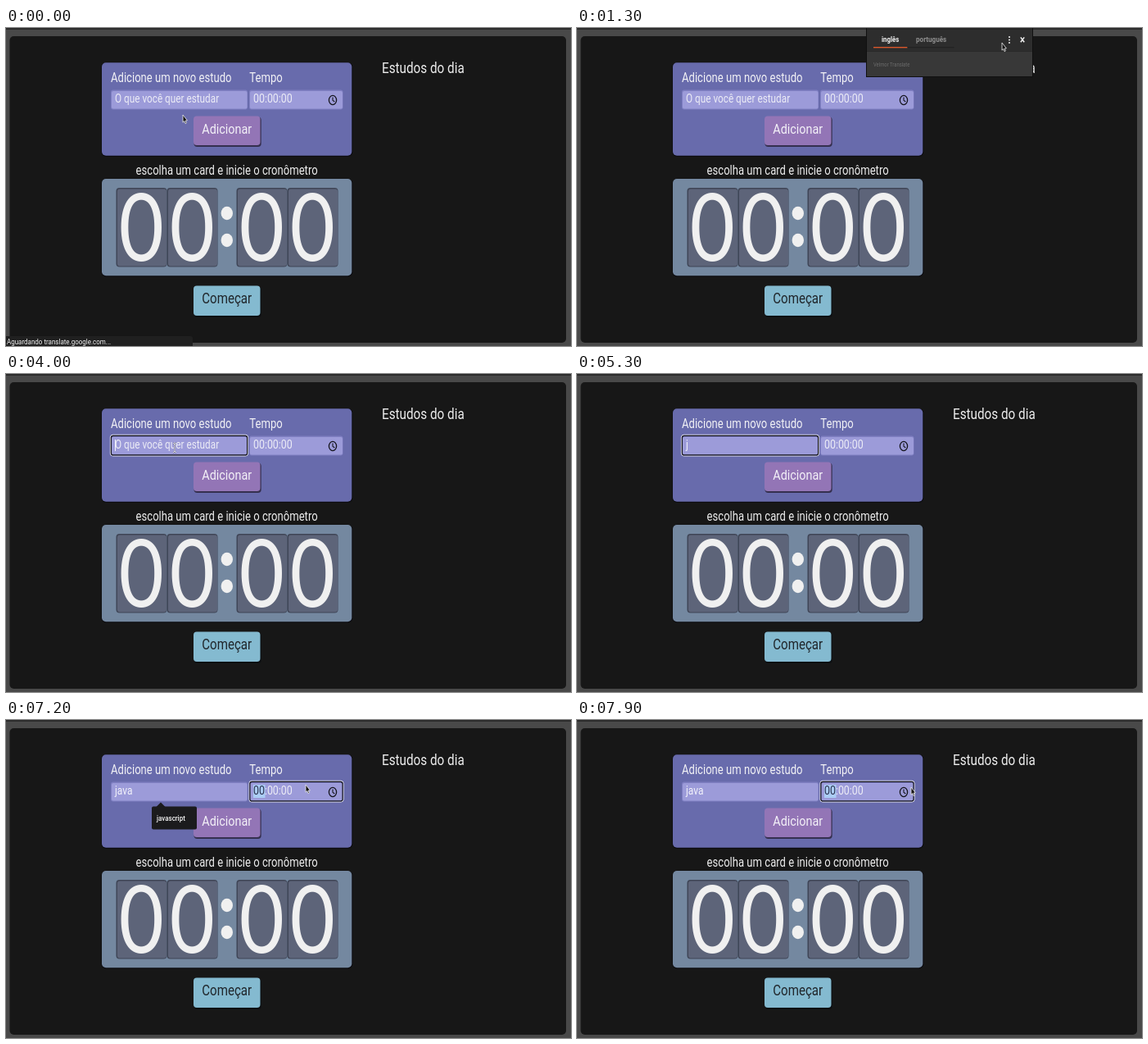
Animation, 690 px wide and 388 px high, one loop 8000 ms. Source, as an HTML page:

```html
<!DOCTYPE html>
<html lang="pt">
<head>
<meta charset="utf-8">
<title>Estudos do dia</title>
<style>
  html, body { margin: 0; width: 100%; height: 100%; overflow: hidden; background: #494949; }
  svg { display: block; width: 100%; height: 100%; }
  text { font-family: Roboto, sans-serif; }
  .digit { font-family: Lato, sans-serif; }
</style>
</head>
<body>
<svg id="stage" viewBox="0 0 690 388" preserveAspectRatio="none"></svg>
<script>
const NS = 'http://www.w3.org/2000/svg';
const LOOP = 8000, STEP = 100;
const TALL = 1.2; // the whole page is shown a little taller than wide
const stage = document.getElementById('stage');

function add(tag, attrs, parent = stage) {
  const el = document.createElementNS(NS, tag);
  for (const k in attrs) el.setAttribute(k, attrs[k]);
  parent.appendChild(el);
  return el;
}
const group = () => add('g', {});
const box = (x, y, w, h, fill, rx = 0, parent = stage, more = {}) =>
  add('rect', { x, y, width: w, height: h, rx, fill, ...more }, parent);
const line = (d, stroke, width, parent = stage) =>
  add('path', { d, stroke, 'stroke-width': width, fill: 'none' }, parent);
function label(str, x, y, size, fill, parent = stage, more = {}) {
  const el = add('text', {
    transform: `translate(${x} ${y}) scale(1 ${TALL})`, 'font-size': size, fill, ...more
  }, parent);
  el.textContent = str;
  return el;
}
const show = (el, on) => el.setAttribute('visibility', on ? 'visible' : 'hidden');

// Page
box(0, 0, 690, 388, '#494949');
box(0, 0, 690, 2, '#2c2c2c');
box(4.5, 10, 679.5, 374, '#171717', 5);

// Form card
function card(y, h, fill) {
  box(116.5, y - .3, 306.8, h + 1.5, '#0c0c10', 5.5);
  box(117, y, 305.3, h, fill, 5);
}
card(42.3, 113.4, '#686bac');
label('Adicione um novo estudo', 128, 65.5, 13.1, '#f1f1f5');
label('Tempo', 297.3, 65.5, 13.1, '#f1f1f5');
label('Estudos do dia', 459, 54.5, 15.3, '#ededed');

function field(x, w) {
  box(x, 75.5, w, 24, '#7f7fc2', 3);
  box(x + 1, 77, w - 1.5, 21.5, '#9c9bd9', 2);
}
field(128, 167);
field(297, 114.5);

const hint = label('O que você quer estudar', 133, 91, 11.8, '#ececf6');
const typed = label('', 133, 91, 12, '#f2f2fa');
const caret = box(133, 80, 1, 14, '#f4f4fb');

const picked = box(302, 79, 14.5, 16, '#abcdf5');
const hours = label('00', 302, 91, 12.4, '#ececf6');
label(':00:00', 315.9, 91, 12.4, '#ececf6');
add('ellipse', { cx: 399, cy: 88, rx: 4.6, ry: 5.6, fill: 'none', stroke: '#14141c', 'stroke-width': 1.3 });
line('M399 84.5V88.3L401.3 90', '#14141c', 1.1);

// Dark ring with a light rim outside
function focusRing(x, w) {
  const g = group();
  box(x - .6, 74.2, w + 1.2, 25.8, 'none', 3, g, { stroke: '#e6e6ee', 'stroke-width': 1 });
  box(x + .4, 75.3, w - .8, 23.6, 'none', 2.5, g, { stroke: '#15151c', 'stroke-width': 1.2 });
  return g;
}
const nameRing = focusRing(128, 167);
const timeRing = focusRing(297.5, 114);

function button(str, y, h, fill, color, size, base, shade) {
  box(229.5, y + 1, 82.2, h + 1, shade, 4);
  box(229, y, 81.5, h, fill, 4);
  label(str, 269.7, base, size, color, stage, { 'text-anchor': 'middle' });
}
button('Adicionar', 107.5, 35.5, '#9375b6', '#f3f0f7', 14.4, 129, '#35304f');

const tip = group();
add('path', { d: 'M183.5 106L189 100.5L194.5 106Z', fill: '#1b1b1d' }, tip);
box(178, 105.5, 55, 28, '#1b1b1d', 2, tip);
label('javascript', 184, 122.8, 8, '#f6f6f6', tip, { 'font-weight': 500 });

// Timer card
label('escolha um card e inicie o cronômetro', 158.6, 179, 13.1, '#ededed');
card(184, 118.2, '#7488a0');
for (const x of [135, 197, 282, 344]) {
  box(x - .5, 195, 62, 96.5, '#3f4556', 4);
  box(x + 1, 196.5, 60, 94, '#5d6479', 3);
  label('0', x + 30.3, 283.5, 95, '#f0f0f0', stage, { 'text-anchor': 'middle', class: 'digit' });
}
for (const cy of [226, 259])
  add('ellipse', { cx: 269.8, cy, rx: 7.2, ry: 8.3, fill: '#f0f0f0' });
button('Começar', 314.5, 36.5, '#84bad0', '#20262b', 15.1, 336, '#0c0f12');

// Browser status line
const status = group();
box(-4, 376, 232, 16, '#202020', 3, status);
label('Aguardando translate.google.com...', 1, 386, 8, '#f2f2f2', status);

// Translation popup
const popup = group();
box(353, 0, 204, 60, '#101010', 0, popup);
box(354, 0, 202, 59, '#383838', 0, popup);
box(354, 0, 202, 28.5, '#2d2d2d', 0, popup);
box(354, 28, 202, 1, '#292929', 0, popup);
box(354, 0, 202, 2, '#262626', 0, popup);
label('inglês', 372, 17, 7.8, '#f4f4f4', popup, { 'font-weight': 700 });
label('português', 414, 17, 8.1, '#8f8f8f', popup, { 'font-weight': 700 });
box(362, 23, 41.5, 1.4, '#d9572b', 0, popup);
box(403.5, 23.3, 57, .9, '#1f1f1f', 0, popup);
label('Velmor Translate', 362, 47, 5.9, '#6b6b6b', popup);
for (const cy of [11, 14.5, 18])
  add('circle', { cx: 528, cy, r: 1, fill: '#f0f0f0' }, popup);
line('M541.8 11.4L546.2 17.2M546.2 11.4L541.8 17.2', '#f4f4f4', 1.5, popup);

// Pointers
const arrow = add('path', {
  d: 'M0 0V9.2L1.8 7.5L3 10.6L4.4 9.9L3.2 7L5.4 6.8Z',
  fill: '#161616', stroke: '#f2f2f2', 'stroke-width': .8
});
const beam = group();
const beamPath = 'M-2 -5.5Q0 -5.5 0 -4V4Q0 5.5 -2 5.5M2 -5.5Q0 -5.5 0 -4M0 4Q0 5.5 2 5.5';
line(beamPath, '#55557e', 1.9, beam);
line(beamPath, '#f2f2f2', 1, beam);

// Pointer runs: each point is [ms, x, y]
const runs = [
  { el: arrow, end: 1400, path: [[0, 216, 106], [300, 232, 100], [600, 300, 84], [900, 384, 58], [1100, 458, 34], [1300, 519, 18]] },
  { el: beam, start: 4000, end: 5300, path: [[4000, 206, 90]] },
  { el: beam, start: 6300, end: 6700, path: [[6300, 206, 90], [6400, 298, 91], [6500, 368.5, 93], [6600, 398, 91]] },
  { el: arrow, start: 6700, end: LOOP, path: [[6700, 424, 84], [6800, 412, 82], [7000, 366, 79], [7200, 366, 79], [7900, 408, 82]] }
];

function along(path, t) {
  let a = path[0];
  for (const b of path) {
    if (t < b[0]) {
      const k = (t - a[0]) / (b[0] - a[0]);
      return [a[1] + (b[1] - a[1]) * k, a[2] + (b[2] - a[2]) * k];
    }
    a = b;
  }
  return [a[1], a[2]];
}

function draw(ms) {
  const t = Math.floor((ms % LOOP) / STEP) * STEP;
  const within = (a, b = LOOP) => t >= a && t < b;

  show(status, within(0, 1000));
  show(popup, within(1000, 4000));

  const word = t < 5300 ? '' : 'java'.slice(0, [1, 2][(t - 5300) / STEP] || 4);
  typed.textContent = word;
  show(hint, !word);
  show(caret, within(4000, 5300));
  show(nameRing, within(4000, 7200));
  show(tip, within(5500, 7400));

  const timeOn = within(7200);
  show(timeRing, timeOn);
  show(picked, timeOn);
  hours.setAttribute('fill', timeOn ? '#2c3350' : '#ececf6');

  show(arrow, false);
  show(beam, false);
  for (const { el, start = 0, end, path } of runs) {
    if (!within(start, end)) continue;
    const [x, y] = along(path, t);
    el.setAttribute('transform', `translate(${x} ${y})`);
    show(el, true);
  }
}

function tick() {
  draw(performance.now());
  requestAnimationFrame(tick);
}
tick();
</script>
</body>
</html>
```
